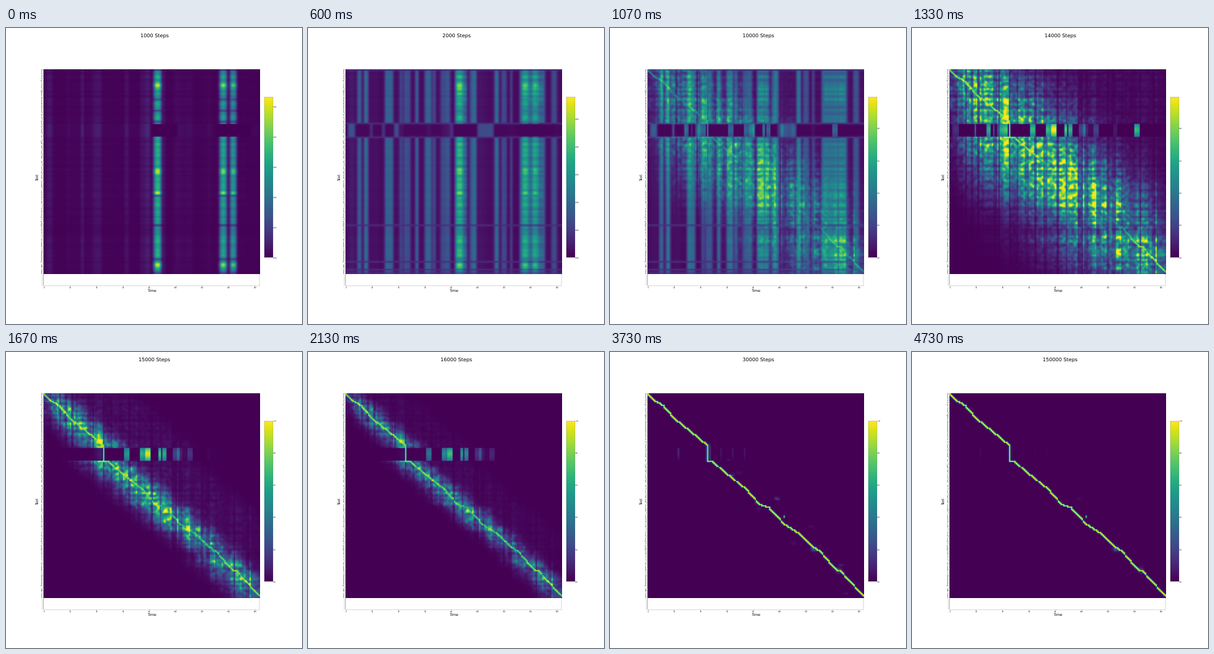
These frames come from a looping animation (480x480 px, 4990 ms). A matplotlib script:

```python
import numpy as np
import matplotlib.pyplot as plt
from matplotlib.animation import FuncAnimation

plt.rcParams["text.hinting"] = "no_hinting"

SIZE, LOOP = 480, 4990
LEFT, RIGHT, TOP, BOTTOM = 60.5, 411.5, 67.0, 417.5
COLS, ROWS, SLOTS = 164, 161, 170
CW, CH = (RIGHT - LEFT) / COLS, (BOTTOM - TOP) / SLOTS
STEPS = [1000, 2000, 5000, 10000, 14000, 15000, 16000, 17000, 18000,
         20000, 25000, 30000, 50000, 100000, 150000]

rng = np.random.default_rng(7)
x = LEFT + (np.arange(COLS) + 0.5) * CW
y = TOP + (np.arange(ROWS) + 0.5) * CH
X, Y = np.meshgrid(x, y)

# corners of the alignment path, in stage pixels
PATH = np.array([
    (61, 68), (71, 78), (86, 87), (103, 107), (134, 132), (158.5, 152),
    (158.5, 177), (167, 178.5), (181, 191), (220, 222), (242, 247), (257, 252),
    (283, 280), (306, 294), (330, 317), (341, 324), (365, 352), (374, 356),
    (398, 382), (411, 396)])
px, py = PATH.T


def bump(v, centre, width, power=2):
    return np.exp(-np.abs((v - centre) / width) ** power)


def span(v, a, b, soft=1.2):
    return 1 / ((1 + np.exp((a - v) / soft)) * (1 + np.exp((v - b) / soft)))


def smooth(a, axis=-1):
    return (np.roll(a, 1, axis) + 2 * a + np.roll(a, -1, axis)) / 4


def runs(n, longest):
    """Random levels, each held for a random number of cells."""
    return np.repeat(rng.random(n), rng.integers(1, longest + 1, n))[:n]


# equal letters give equal rows, which makes the horizontal streaks
letters = rng.choice(24, ROWS, p=np.arange(24, 0, -1) / 300)
row_gain = smooth(rng.random(24)[letters])[:, None]
col_gain = runs(COLS, 3)
grain = smooth(rng.random((24, COLS)) ** 2.2)[letters]
texture = (0.25 + col_gain) * (0.2 + row_gain) * (0.25 + 2.1 * smooth(grain, 0))
band = (y > 155) & (y < 177)


def trace():
    k = np.arange(len(PATH))
    t = np.linspace(0, k[-1], 6000)
    c = (np.interp(t, k, px) - LEFT) / CW
    r = (np.interp(t, k, py) - TOP) / CH
    out = np.zeros((ROWS, COLS))
    out[np.clip(r.astype(int), 0, ROWS - 1), np.clip(c.astype(int), 0, COLS - 1)] = 1
    return out


line = trace()
offset = X - np.interp(Y, py, px)
strip = runs(COLS, 4)


def beams():
    peaks = bump(x, 245.3, 6, 3) + 0.9 * bump(x, 351.8, 5.8, 3) + 0.76 * bump(x, 368.3, 5, 3)
    rows = 0.42 + 0.28 * row_gain[:, 0]
    for centre in (93, 233, 268, 384):
        rows = rows + 0.35 * bump(y, centre, 4)
    for centre in (68, 116, 134, 152, 272, 320, 375, 397):
        rows = rows * (1 - 0.65 * bump(y, centre, 2.2))
    faint = 0.01 + 0.08 * smooth(strip) ** 3
    out = rows[:, None] * peaks + faint * (0.3 + row_gain)
    quiet = span(x, 235, 278) + span(x, 339, 396)
    out[band] = 1.4 * faint * (1 - quiet)
    return out


def stripes():
    u = runs(COLS, 5)
    level = np.where(u < 0.52, 0.04 + 0.12 * u, 0.1 + 0.7 * u)
    cores = span(x, 240, 257, 0.6) + span(x, 347, 381, 0.6)
    level = smooth(level * (1 - cores) + 0.62 * cores)
    hot = 0.5 * (row_gain - 0.4) + 0.25 * span(Y, 94, 116, 2)
    out = level * (0.92 + 0.12 * row_gain) + hot * cores * (0.5 + 0.6 * col_gain)
    out[band] = 0.03 + 0.45 * smooth((level < 0.14) & (strip > 0.5)) * (1 - cores)
    for centre in (68, 155, 177, 320, 379, 392, 397):
        m = 0.75 * bump(Y, centre, 1.6)
        out = out * (1 - m) + (0.34 - 0.25 * level) * m
    return out


def clouds(width, gain, reach):
    """Texture around the path; reach is how far the wide row band lights up."""
    side = np.where(offset < 0, width * 1.15, width)
    veil = 0.06 * gain * span(offset, -2 * width, 5 * width, width / 3)
    out = gain * texture * (bump(offset, 0, side) + veil)
    ticks = np.clip(2.6 * strip - 1.35, 0, 1) * bump(x, 245, reach, 4)
    out[band] = (gain * ticks * (0.55 + 0.45 * bump(Y, 165, 9)))[band]
    loose = span(X, 215, 345, 6) * min(1, width / 95)
    return np.maximum(out, line * (0.92 - 0.6 * loose) * (0.8 + 0.4 * grain))


def scatter(count, spread):
    out = np.zeros((ROWS, COLS))
    for _ in range(count):
        cx = rng.uniform(180, 385)
        cy = np.interp(cx, px, py) + rng.normal(0, spread)
        w, h = rng.uniform(1.5, 6), rng.uniform(1.3, 3.5)
        out += rng.uniform(0.2, 0.7) * bump(X, cx, w, 4) * bump(Y, cy, h, 4)
    return out * (0.2 + 1.6 * grain)


haze = scatter(16, 13)
knots = sum(0.5 * bump(X, cx, 4) * bump(Y, cy, 4) for cx, cy in [(330, 319), (371, 354)])
dot = bump(X, 282, 1.4, 4) * bump(Y, 267, 1.4, 4)


def settled(amount):
    """Finished alignment with a fading share of stray attention."""
    out = amount * haze + knots * (0.3 + grain) + 0.9 * dot
    ticks = 0.7 * bump(x, 110, 1.2, 4) + sum(0.3 * bump(x, c, 1.2, 4) for c in (180, 198, 218))
    out[band] += (amount * ticks * span(Y, 150, 172, 3))[band]
    drop = span(Y, 150, 177) * (np.abs(X - 158.5) < 4)
    out += 0.5 * amount * drop
    return np.maximum(out, line * (0.97 - 0.35 * amount * drop))


first, second = beams(), stripes()
third, fourth = clouds(95, 1, 150), clouds(28, 0.95, 75)
maps = [first, 0.5 * first + 0.45 * second, second, 0.5 * second + 0.45 * third,
        third, fourth, clouds(20, 0.7, 70), clouds(13, 0.5, 60)]
maps += [settled(0.6 ** i) for i in range(len(STEPS) - len(maps))]
maps = [np.clip(m, 0, 1) for m in maps]


def place(x0, y0, x1, y1):
    ax = fig.add_axes([x0 / SIZE, 1 - y1 / SIZE, (x1 - x0) / SIZE, (y1 - y0) / SIZE])
    for s in ax.spines.values():
        s.set_linewidth(0.12)
    ax.tick_params(length=0.8, width=0.3, pad=0.5, labelsize=1.85)
    return ax


def write(cx, cy, s, size, **kw):
    return fig.text(cx / SIZE, 1 - cy / SIZE, s, fontsize=size, ha="center",
                    va="center", **kw)


fig = plt.figure(figsize=(4.8, 4.8), dpi=100, facecolor="white")
ax = place(LEFT, TOP, RIGHT, BOTTOM)
image = ax.imshow(maps[0], cmap="viridis", vmin=0, vmax=1, aspect="auto")
ax.set_xlim(-0.5, COLS - 0.5)
ax.set_ylim(SLOTS - 0.5, -0.5)
ax.set_xticks(range(0, COLS, 20))
names = ["etaoinshrdlucmfwypvbgkqx"[i] for i in letters] + ["_"] * (SLOTS - ROWS)
ax.set_yticks(range(SLOTS), names, fontsize=1.9)

cax = place(418.5, 112, 432.5, 372.5)
cax.imshow(np.linspace(0, 1, 256)[:, None], cmap="viridis", origin="lower",
           extent=(0, 1, 0, 1), aspect="auto")
cax.set_xticks([])
cax.yaxis.tick_right()

title = write(240.5, 13.3, "", 5.85)
write(236, 426, "Time", 4.3)
write(51.5, 242, "Text", 4.1, rotation=90)


def scale(i):
    """Top value, tick gap and decimals of the colour bar."""
    if i < 2:
        return (0.16, 0.03, 2) if i == 0 else (0.58, 0.1, 2)
    return 0.995 if i < 5 else 1.0, 0.2, 1


def update(i):
    image.set_data(maps[i])
    title.set_text(f"{STEPS[i]} Steps")
    top, gap, digits = scale(i)
    ticks = np.arange(0, top + 1e-6, gap)
    cax.set_yticks(ticks / top, [f"{t:.{digits}f}" for t in ticks])
    return image, title


anim = FuncAnimation(fig, update, frames=len(STEPS), interval=LOOP / len(STEPS),
                     repeat=True, repeat_delay=0, blit=False)
plt.show()
```
